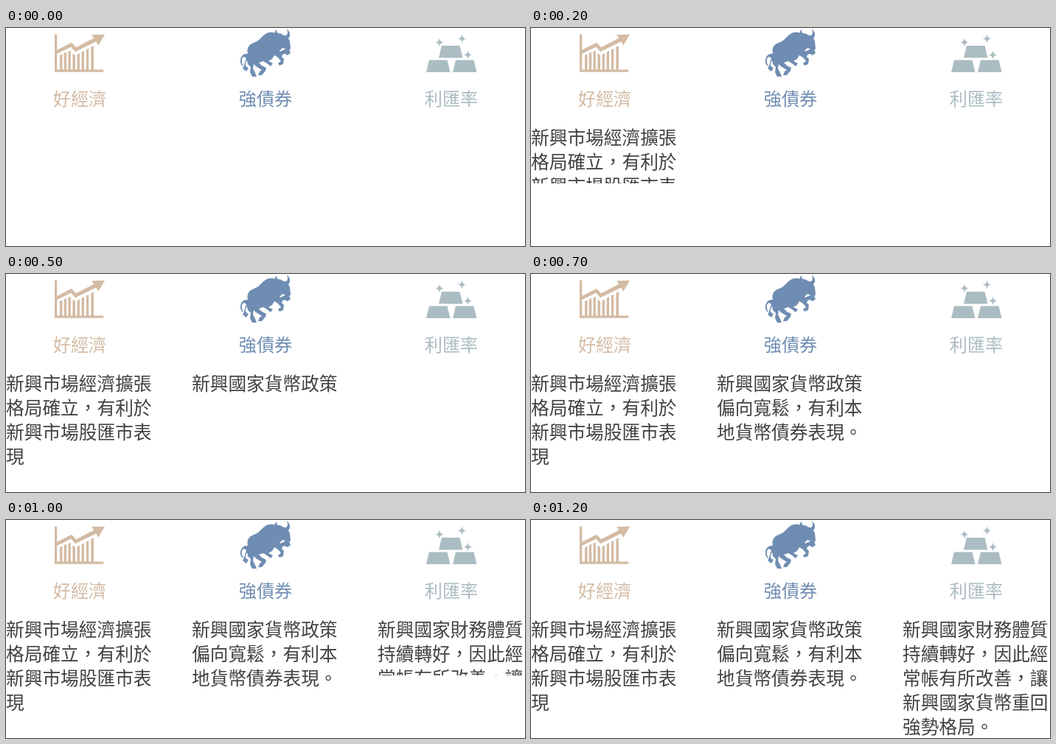
An HTML page that plays this animation: 704x296 px, repeating every 1.3 s.

```html
<!DOCTYPE html>
<html lang="zh-Hant">
<head>
<meta charset="utf-8">
<title>好經濟 強債券 利匯率</title>
<style>
html, body { margin: 0; width: 100%; height: 100%; overflow: hidden; background: #fff; }
.stage { position: relative; width: 704px; height: 296px; overflow: hidden;
  font: 500 24.7px "Noto Sans CJK TC", "Noto Sans CJK", "Noto Sans", sans-serif; }
svg { position: absolute; left: 0; top: 0; }
h2, p { position: absolute; margin: 0; white-space: nowrap; }
h2 { top: 77.5px; width: 200px; font: inherit; font-size: 24.2px; line-height: 33px; text-align: center; }
p { top: 129px; height: 164px; padding-top: 1.5px; box-sizing: border-box;
  color: #414141; line-height: 33px; animation: 1300ms linear infinite; }
.c1 { left: 0; }
.c2 { left: 252px; }
.c3 { left: 504px; }
p.c1 { animation-name: wipe1; }
p.c2 { animation-name: wipe2; height: 103px; }
p.c3 { animation-name: wipe3; }
.sand { color: #d3bba4; }
.blue { color: #6f8db3; }
.mist { color: #abbdc2; }
g { fill: currentColor; }

/* Each wipe jumps one step down every 100 ms. */
@keyframes wipe1 {
  0%, 7.69% { clip-path: inset(0 0 100% 0); animation-timing-function: steps(4, start); }
  38.46%, 100% { clip-path: inset(0); }
}
@keyframes wipe2 {
  0%, 38.46% { clip-path: inset(0 0 100% 0); animation-timing-function: steps(3, start); }
  61.53%, 100% { clip-path: inset(0); }
}
@keyframes wipe3 {
  0%, 69.23% { clip-path: inset(0 0 100% 0); animation-timing-function: steps(4, start); }
  100% { clip-path: inset(0); }
}
</style>
</head>
<body>
<div class="stage">
  <svg width="704" height="296" viewBox="0 0 704 296">
    <defs>
      <path id="bar" d="M0 0h24.5l4 16.5h-32.5z"/>
      <path id="star" d="M0-6Q.6-.6 6 0Q.6.6 0 6Q-.6.6-6 0Q-.6-.6 0-6z"/>
    </defs>
    <g class="sand">
      <path d="M66 8.5h3.2v48h63v3.3H66z"/>
      <path d="M73 37l3.4-1.6V57H73zM78.7 34.2l3.4-1.6V57h-3.4zM84.4 32l3.4-1.6V57h-3.4zM90.4 34.5l3.6 2.6V57h-3.6zM96.5 36l3.4-1.8V57h-3.4zM102.6 32.8l3.4-1.8V57h-3.4zM108.8 29.5l3.4-1.8V57h-3.4zM115.3 26l3.6-1.9V57h-3.6z"/>
      <path d="M69 30l20-10.3 6 6.5 24.2-12.4-3-4.6 17.8-.4-8.6 14.6-3.3-4.9L94 32.2l-5.8-6.4L69 35z"/>
    </g>
    <g class="blue">
      <path d="M381 1C385 5 387 10 383 14L385 18L386 27C386 30 383 31 380 29L375 27L371 31L376 34L374 39L377 42L376 49L371 51L369 48L373 45L369 40L364 37L361 42L356 45L362 48L359 52L354 48L349 45L343 47L347 51L353 54L352 58L347 64H342L344 59L347 57L339 52L336 49L335 55L338 61L340 66H334L331 60L332 53L328 49L327 44C323 49 325 53 329 54L326 59L321 55C324 51 323 47 326 42C324 37 319 39 320 46C320 49 322 50 322 52C317 50 317 42 320 38C323 34 328 35 328 35C326 27 330 22 336 20C343 18 345 13 352 8C358 4 365 6 369 9C373 7 377 11 380 10C383 8 382 4 381 1z"/>
      <path d="M370 10C363 9 363 4 368 2C365 6 369 7 374 8L376 11zM376 30L383 27L386 34L382 37L378 35L372 37L368 34z"/>
    </g>
    <g class="mist">
      <use href="#bar" x="591" y="24"/>
      <use href="#bar" x="574" y="43.5"/>
      <use href="#bar" x="610" y="43.5"/>
      <use href="#star" x="588" y="19.5"/>
      <use href="#star" x="618.5" y="14.5"/>
      <use href="#star" x="626.5" y="36.5"/>
    </g>
  </svg>
  <h2 class="c1 sand">好經濟</h2>
  <h2 class="c2 blue">強債券</h2>
  <h2 class="c3 mist">利匯率</h2>
  <p class="c1">新興市場經濟擴張<br>格局確立，有利於<br>新興市場股匯市表<br>現</p>
  <p class="c2">新興國家貨幣政策<br>偏向寬鬆，有利本<br>地貨幣債券表現。</p>
  <p class="c3">新興國家財務體質<br>持續轉好，因此經<br>常帳有所改善，讓<br>新興國家貨幣重回<br>強勢格局。</p>
</div>
</body>
</html>
```
